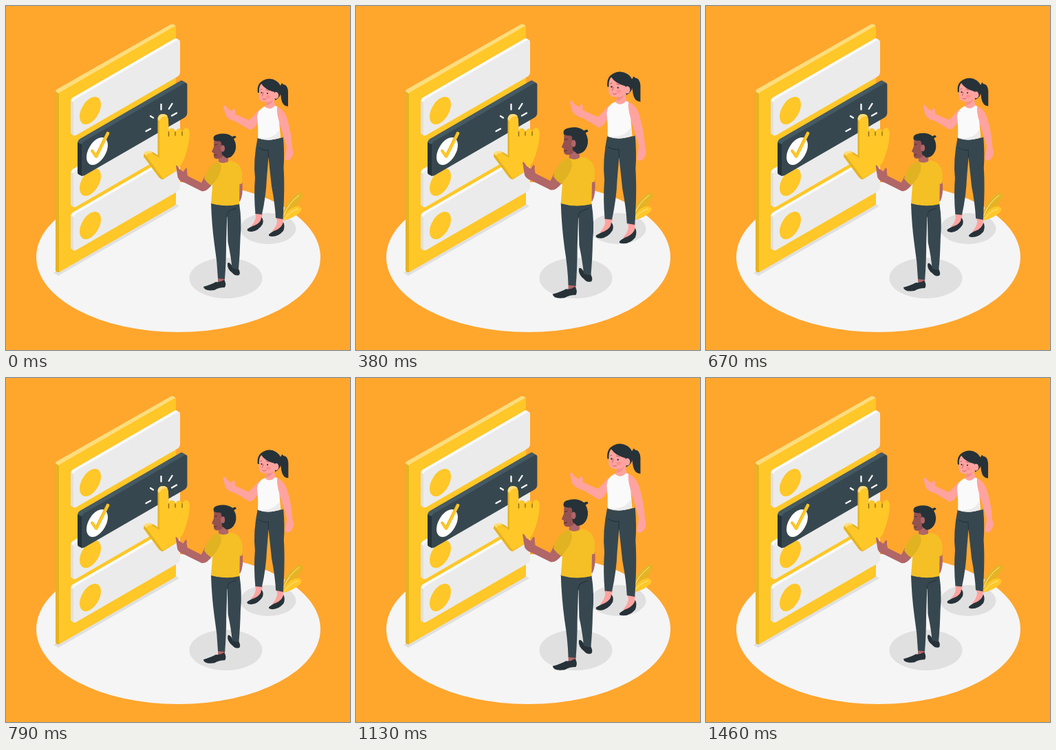
Animation of 500 by 500 pixels, one loop 1500 ms. Source, as an HTML page:

```html
<!DOCTYPE html>
<html lang="en">
<head>
<meta charset="utf-8">
<title>Making a choice</title>
<style>
  html, body { margin: 0; width: 100%; height: 100%; overflow: hidden; background: #ffa62d; }
  svg { display: block; width: 100vw; height: 100vh; }
  .line { fill: none; stroke-linecap: round; stroke-linejoin: round; }
  .skin { fill: #ffa3a0; }
  .tan { fill: #b16668; }
  .dark { fill: #263238; }
  .cloth { fill: #37474f; }
  .gold { fill: #ffc727; }
  .amber { fill: #e6b323; }
  .light { fill: #ffdd7d; }
</style>
</head>
<body>
<svg viewBox="0 0 500 500">
  <ellipse cx="250.5" cy="365" rx="206.5" ry="109" fill="#f5f5f5"/>
  <path d="M69 388L76 392L252 291L246 287Z" fill="#e0e0e0"/>

  <!-- board -->
  <path class="amber" d="M72 124L78 127V387L74 387Q72 386 72 384Z"/>
  <path class="light" d="M72 124Q72 122 74 121L240 26.500Q242 25.500 246 28L246.500 31L78 128Z"/>
  <path class="gold" d="M77 128Q77 126 79 125L244 30Q247 28 247 32V287Q247 289 245 290L77 387Z"/>
  <g id="slots"></g>

  <path class="line" d="M125 210.500L130.500 218.500L147.500 184.500" stroke="#e6b323" stroke-width="3.600"/>
  <path class="line" d="M126 211L131.500 219L148.500 185" stroke="#ffc727" stroke-width="3.800"/>
  <path class="line" d="M225.500 143V150.500M241.500 142L236.800 149.500M210 160L214 162.500M203.500 182L210 178.500M241 159.500L248 155.500" stroke="#fff" stroke-width="2.300"/>

  <!-- pointer -->
  <path class="amber" d="M220.500 166Q220 157 228 157Q236 158 236 166L236.500 183Q238 177 242 178Q246 179 246 184Q248 178 252 178.500Q256 179 256 184Q258 177 262 177Q267 178 267 186Q266 206 257 227L247 240L228 252Q224 252 220 246L200 219Q199 213 208 211Q215 212 220.500 217Z"/>
  <path class="gold" d="M223 168Q223 160 229 159Q236 159 236 167L236.500 183Q238 177 242 178Q246 179 246 184Q248 178 252 178.500Q256 179 256 184Q258 177 262 177Q267 178 267 186Q266 206 257 227L247 240L228 251L204 218Q206 212 212 214L223 221Z"/>
  <path class="light" d="M220.500 165Q221 157 228 157Q234 157 235 161Q227 158 223 167ZM200 214Q204 210 210 211L213 214Q206 213 204 218Z"/>
  <path class="line" d="M236.500 183V189M246 183V188M256 183V188" stroke="#8a6b15" stroke-width="1.400"/>

  <!-- shadows and plant -->
  <ellipse cx="319.500" cy="395.500" rx="53" ry="29.500" fill="#e0e0e0"/>
  <ellipse cx="381" cy="323.500" rx="40.500" ry="22.500" fill="#e0e0e0"/>
  <path class="amber" d="M402 308Q403 284 425 272Q434 270 431 278Q424 291 403 309Z"/>
  <path class="gold" d="M402 312Q409 292 425 291Q433 294 427 300Q417 309 402 312Z"/>
  <path class="line" d="M404 304Q410 287 426 275M405 309Q413 298 424 295" stroke="#ffe9a8" stroke-width="1"/>

  <g id="woman">
    <path class="dark" d="M398 117L401 112L403 114Q409 114 410 124V146Q402 146 400 135Q399 126 397 121Z"/>
    <path class="skin" d="M391 145Q403 148 408 162Q415 184 416 206Q420 214 414 222Q408 227 405 222L408 205Q403 186 398 173Z"/>
    <path class="skin" d="M362 300L373 302Q371 315 363 321L356 320Q362 314 363 307ZM392 306L403 308L402 317Q397 325 389 329L387 327Q394 319 394 312Z"/>
    <path class="dark" d="M351 324Q357 320 361 319Q371 315 371 307Q375 310 373 317Q367 327 357 328Q349 328 351 324ZM382 332Q388 327 392 326Q401 322 403 314Q406 320 403 327Q396 335 387 335Q381 335 382 332Z"/>
    <path class="cloth" d="M366 190Q384 197 403 191Q405 215 403.500 235Q405.500 265 402.500 310L392 308Q391 288 386 262L381.500 220L379 250Q378 276 372 303L362.500 302Q360 276 362 250Q359 224 366 190Z"/>
    <path class="line" d="M367 206Q375 211 381 209L381.500 220" stroke="#263238" stroke-width="1"/>
    <path class="skin" d="M366 152Q373 150 367 168Q360 180 354 180L334 168Q322 165 319 158L316 146Q318 142 322 149L328 153L331 149Q334 149 333 157L353 166Q361 159 366 152Z"/>
    <path class="skin" d="M371 112Q366 124 368 135Q371 140 379 139.500L377 146Q384 155 392 146L389.500 137L394 134V114Z"/>
    <path d="M365 161Q366 150 376 146Q383 153 391 145L394 146Q393 155 397 168Q398 181 399 191Q382 198 366 192Q367 178 365 161Z" fill="#fafafa"/>
    <path d="M368 192Q389 194 397 180L399 191Q382 198 366 192Z" fill="#ebebeb"/>
    <path d="M379 139.500Q385 140 388 136Q387 143 378 145Z" fill="#f28f8f"/>
    <path class="dark" d="M366 126Q364 113 374 108Q384 103 393 109Q400 114 400 122Q400 133 391 137L390 125Q377 122 371 113Q367 118 368 126Z"/>
    <ellipse class="skin" cx="392.500" cy="130" rx="3.700" ry="5"/>
    <path class="line" d="M369.500 122L372 121M378 122L382 123M374 126L372.500 131M373 135Q375 137 378 135" stroke="#b65353" stroke-width=".8"/>
    <circle class="dark" cx="371.500" cy="126" r="1.100"/><circle class="dark" cx="380" cy="127" r="1.100"/>
    <ellipse cx="381" cy="132" rx="3" ry="2.200" fill="#ff8f8f"/>
  </g>

  <g id="man">
    <path class="tan" d="M339 256H343.500Q345 275 340 284L337 283ZM308 394H318V402H308ZM329 378L338 380V385L330 385Z"/>
    <path class="dark" d="M287 408Q298 405 305 401Q311 402 317 398Q321 404 318 409Q309 409 303 413Q288 415 287 408ZM322 374Q324 371 328 377Q332 383 338 382Q341 387 339 391Q333 393 329 388Q321 382 322 374Z"/>
    <path class="cloth" d="M298 286Q318 293 339 287Q343 312 340.500 338Q340 362 338 383L328.500 381Q327 364 322.500 343L321.500 300L320 345Q320 373 318 397L308 396Q307 371 303 347Q299 318 298 286Z"/>
    <path class="line" d="M321.500 306Q321 301 324 298L334 294" stroke="#263238" stroke-width="1"/>
    <path class="tan" d="M247 232Q249 231 252 237L258 241L261 236Q264 235 263 241L264 247L284 257L289 247L300 259Q291 271 284 269L260 257Q249 254 249 245Z"/>
    <path class="tan" d="M309 216H323V227Q316 232 309 228Z"/>
    <path d="M308 226Q317 231 325 225Q341 226 343.500 244L343 258L339.500 259L339 288Q318 293 298 287L300 262L303 236Z" fill="#f4c025"/>
    <path d="M288 251Q294 231 308 226Q315 230 312 240Q308 252 298 261Q292 257 288 251Z" fill="#e1b322"/>
    <path d="M302.500 192L302 205L299 212L302 214Q301 221 305 222Q311 223 316 218L319 209L316 192Z" fill="#945250"/>
    <path class="dark" d="M302 195Q300 189 306 187Q320 183 329 190Q334 187 334.500 191L331 193Q336 202 333 211Q329 221 320 221L314 216L313 204Q314 198 311 196.500Q306 197 302 195Z"/>
    <ellipse class="tan" cx="315" cy="207" rx="3" ry="4.800"/>
    <path class="line" d="M303.500 202L306.500 201.500M303 217L306 216.500" stroke="#4c2b2b" stroke-width=".9"/>
  </g>
</svg>
<script>
const $ = id => document.getElementById(id);
const CYCLE = 750, GROWTH = 0.09;

// A rounded isometric slab with a disc on its face.
function slab(x, y, w, h, depth, [face, top, side], disc) {
  const rect = (offset, fill) =>
    `<g transform="translate(${x - offset} ${y - offset * 0.577}) skewY(-30)">` +
    `<rect width="${w}" height="${h}" rx="4" ry="4.600" fill="${fill}"/></g>`;
  let out = '';
  for (let i = depth; i > 0; i--) out += rect(i, top);
  out += `<path fill="${side}" d="M${x - depth} ${y}L${x + 1} ${y + 3}V${y + h - 1}` +
    `L${x - depth + 1} ${y + h - 4}Q${x - depth} ${y + h - 5} ${x - depth} ${y + h - 7}Z"/>`;
  return out + rect(0, face) +
    `<g transform="translate(${x + disc.x} ${y + disc.y}) skewY(-30)">` +
    `<ellipse rx="15.500" ry="17.900" fill="${disc.fill}"/></g>`;
}

const pale = ['#ebebeb', '#fafafa', '#e0e0e0'];
const slate = ['#37474f', '#455a64', '#263238'];
$('slots').innerHTML =
  [137, 241, 304].map(y => slab(98, y, 155, 53, 4, pale, { x: 24.5, y: 15, fill: '#ffc727' })).join('') +
  slab(110, 198.5, 153.4, 50, 6, slate, { x: 22.5, y: 12.5, fill: '#fff' });

// Cubic Bezier easing, solved by bisection.
function bezier(x1, y1, x2, y2) {
  const at = (a, b, u) => 3 * a * u * (1 - u) ** 2 + 3 * b * u * u * (1 - u) + u ** 3;
  return x => {
    let low = 0, high = 1;
    for (let i = 0; i < 24; i++) {
      const mid = (low + high) / 2;
      if (at(x1, x2, mid) < x) low = mid; else high = mid;
    }
    return at(y1, y2, low);
  };
}
const rise = bezier(0.25, 0.1, 0.25, 1);
const fall = bezier(0.42, 0, 0.58, 1);

function scaleAbout(id, x, y, s) {
  $(id).setAttribute('transform', `translate(${x} ${y}) scale(${s}) translate(${-x} ${-y})`);
}

function draw() {
  const phase = performance.now() % CYCLE / (CYCLE / 2);
  const pulse = phase < 1 ? rise(phase) : 1 - fall(phase - 1);
  const s = 1 + GROWTH * pulse;
  scaleAbout('woman', 372, 220, s);
  scaleAbout('man', 301, 288, s);
  requestAnimationFrame(draw);
}
draw();
</script>
</body>
</html>
```
